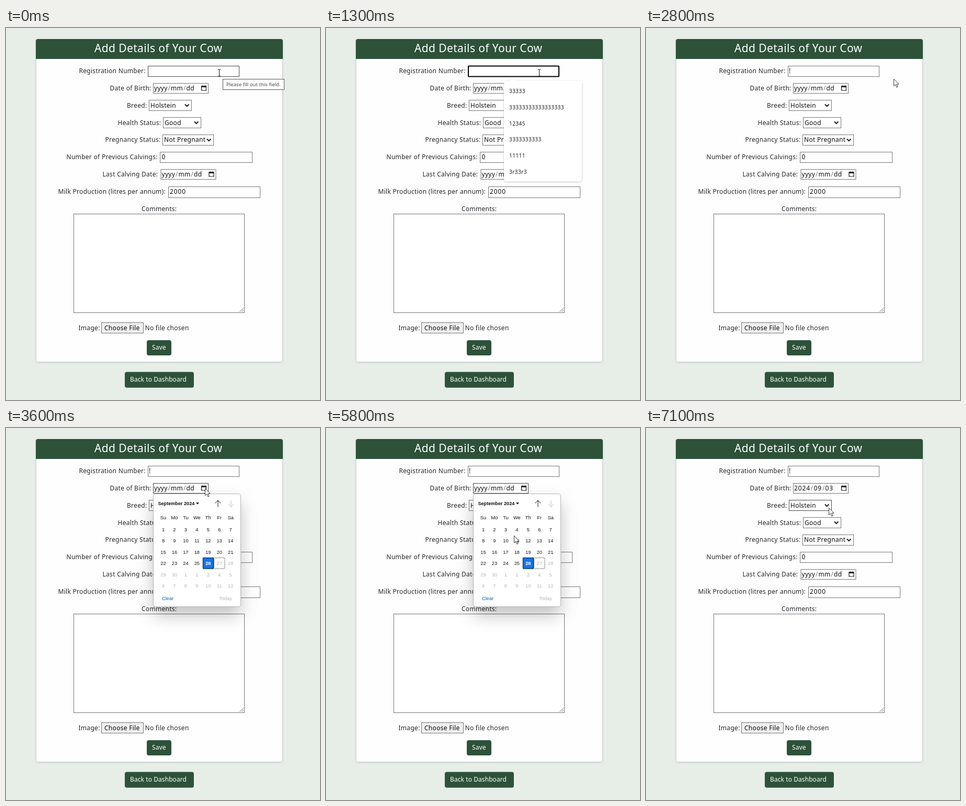
An HTML page for the animation above (8 s loop, 600 by 709 pixels).

```html
<!DOCTYPE html>
<html lang="en">
<head>
<meta charset="utf-8">
<title>Add Details of Your Cow</title>
<style>
  html, body { margin: 0; width: 100%; height: 100%; overflow: hidden; background: #e7ede7; }
  svg { display: block; width: 100%; height: 100%; }
  text { font: 12px "Noto Sans", "Open Sans", sans-serif; letter-spacing: .29px; fill: #212529; white-space: pre; }
  .value { fill: #0c0c0c; }
  .digits { fill: #0c0c0c; letter-spacing: .9px; }
  .slash { fill: #777; }
  .title { font-size: 21px; letter-spacing: .38px; fill: #fff; }
  .button { font-weight: 500; letter-spacing: .08px; fill: #fff; }
  .tip { font-size: 9.6px; letter-spacing: 0; fill: #4a4a4a; }
  .option { font-size: 10px; font-weight: 500; letter-spacing: .45px; fill: #1c1c1c; }
  #calendar text { font: 9.3px "Liberation Sans", Arial, sans-serif; letter-spacing: 0; fill: #111; }
  #calendar .month { font-size: 9.1px; font-weight: bold; }
  #calendar .day { text-anchor: middle; }
  #calendar .muted { fill: #b5b5b5; }
  #calendar .picked { fill: #fff; font-weight: bold; }
  #calendar .link { fill: #0b63a5; }
  .field { fill: #fff; stroke: #767676; }
  .green { fill: #2d5239; }
  .line { fill: none; stroke: #111; }
  .hover { fill: none; stroke: #484848; }
</style>
</head>
<body>
<svg id="stage" viewBox="0 0 600 709">
  <defs>
    <filter id="cardShadow" x="-5%" y="-5%" width="110%" height="110%">
      <feDropShadow dx="0" dy="1" stdDeviation="1.8" flood-opacity=".12"/>
    </filter>
    <filter id="listShadow" x="-10%" y="-10%" width="120%" height="120%">
      <feDropShadow dx="0" dy="1" stdDeviation="1.8" flood-opacity=".28"/>
    </filter>
    <filter id="calendarShadow" x="-40%" y="-30%" width="180%" height="170%">
      <feDropShadow dx="0" dy="17" stdDeviation="16" flood-opacity=".24"/>
    </filter>
  </defs>
  <rect width="600" height="709" fill="#e7ede7"/>
  <rect x="57" y="21" width="472" height="616" rx="4" fill="#fffefe" filter="url(#cardShadow)"/>
  <rect x="57.5" y="21.5" width="471" height="615" rx="4" fill="none" stroke="#c9d0ca"/>
  <path class="green" d="M57 59V25q0-4 4-4h464q4 0 4 4v34z"/>
  <g id="form"></g>
  <g id="focus">
    <rect x="272" y="72.5" width="173" height="20" rx="1.5" fill="#fff" stroke="#000" stroke-width="2"/>
  </g>
  <g id="mark"><text class="value" x="273" y="86">!</text></g>
  <rect id="regHover" class="hover" x="271.5" y="72.5" width="174" height="20"/>
  <rect id="dateHover" class="hover" x="281.5" y="105.5" width="105" height="19"/>
  <rect id="breedHover" class="hover" x="273.5" y="137.5" width="81" height="20"/>
  <g id="emptyDate"></g>
  <g id="filledDate"></g>
  <g id="tooltip">
    <rect x="414.5" y="97.5" width="117" height="20" fill="#fff" stroke="#555"/>
    <text class="tip" x="421" y="111">Please fill out this field.</text>
  </g>
  <g id="options">
    <path d="M345 101h139q5 0 5 5v181.5q0 5-5 5H345q-5 0-5-5V106q0-5 5-5h6l7-4 7 4z" fill="#fff" filter="url(#listShadow)"/>
  </g>
  <g id="calendar">
    <rect x="282" y="126" width="166" height="214" rx="4" fill="#fff" filter="url(#calendarShadow)"/>
    <rect x="281.5" y="125.5" width="167" height="215" rx="4" fill="none" stroke="#b4b4b4"/>
    <text class="month" x="290.5" y="147">September 2024</text>
    <path d="M363 142h6l-3 3.5z" fill="#111"/>
    <path class="line" d="M405 150.5v-12.5m-5.5 5.5l5.5-5.5 5.5 5.5"/>
    <path class="line" style="stroke:#bbb" d="M430 138v12.5m-5.5-5.5l5.5 5.5 5.5-5.5"/>
    <rect x="376.5" y="247.5" width="20" height="20.5" rx="1" fill="#1a73e8" stroke="#123a70" stroke-width="1.5"/>
    <rect x="397.5" y="247.5" width="20.5" height="20.5" rx="1" fill="none" stroke="#8c8c8c"/>
    <text class="link" x="298" y="328">Clear</text>
    <text class="muted" x="407" y="328">Today</text>
  </g>
  <g id="beam">
    <path fill="none" stroke="#fff" stroke-width="2.5" d="M0-6V6"/>
    <path class="line" d="M-3-6.5h2.5l.5.5.5-.5H3M0-6V6M-3 6.5h2.5l.5-.5.5.5H3"/>
  </g>
  <path id="arrow" fill="#fff" stroke="#222" stroke-width=".9" stroke-linejoin="round"
    d="M0 0V13.7L3.2 10.8 5.4 16 7.6 15.1 5.4 10.1H9.7Z"/>
</svg>
<script>
const NS = 'http://www.w3.org/2000/svg';
const $ = id => document.getElementById(id);

function add(parent, tag, attrs, content = '') {
  const node = document.createElementNS(NS, tag);
  for (const key in attrs) node.setAttribute(key, attrs[key]);
  node.textContent = content;
  return parent.appendChild(node);
}
const form = $('form');
const write = (parent, content, x, y, style = '') => add(parent, 'text', { x, y, class: style }, content);
const box = (x, y, width, height, extra = {}) =>
  add(form, 'rect', { x: x + .5, y: y + .5, width, height, class: 'field', ...extra });
const path = (d, extra = {}) => add(form, 'path', { d, class: 'line', ...extra });

function select(x, y, width, value, baseline) {
  box(x, y, width, 20);
  write(form, value, x + 3, baseline, 'value');
  path(`M${x + width - 12} ${y + 8.5}l3.7 3.7 3.7-3.7`, { 'stroke-width': 1.8 });
}

function dateParts(parent, x, y, parts, offsets, style) {
  const [year, month, day] = parts;
  const [slash1, m, slash2, d] = offsets;
  write(parent, year, x, y, style);
  write(parent, '/', x + slash1, y, 'slash');
  write(parent, month, x + m, y, style);
  write(parent, '/', x + slash2, y, 'slash');
  write(parent, day, x + d, y, style);
}
const blankDate = (parent, x, y) =>
  dateParts(parent, x, y, ['yyyy', 'mm', 'dd'], [26.5, 32, 56, 61.5], 'value');

function dateBox(x, y) {
  box(x, y, 105, 19);
  const left = x + 92.5, top = y + 6;
  path(`M${left} ${top}h9v8h-9z`, { 'stroke-width': 1.2 });
  path(`M${left} ${top + .7}h9`, { 'stroke-width': 2.4 });
  path(`M${left + 2} ${top - 1.7}v2m5-2v2`, { 'stroke-width': 1.2 });
}

function button(x, y, width, height, label, textX, baseline) {
  add(form, 'rect', { x, y, width, height, rx: 4, class: 'green' });
  write(form, label, textX, baseline, 'button');
}

write(form, 'Add Details of Your Cow', 169, 46.4, 'title');
[
  ['Registration Number:', 139.5, 86], ['Date of Birth:', 198.5, 119],
  ['Breed:', 231, 152], ['Health Status:', 213.5, 185],
  ['Pregnancy Status:', 189.5, 217], ['Number of Previous Calvings:', 115.5, 250],
  ['Last Calving Date:', 184.5, 283], ['Milk Production (litres per annum):', 99.5, 316],
  ['Comments:', 259, 348.5], ['Image:', 138.5, 575.5]
].forEach(([label, x, y]) => write(form, label, x, y));

box(271, 72, 174, 20);
dateBox(281, 105);
select(273, 137, 81, 'Holstein', 152);
select(300, 170, 72, 'Good', 185);
select(299, 203, 97, 'Not Pregnant', 217);
box(294, 236, 176, 20);
write(form, '0', 297.5, 250, 'digits');
dateBox(295.5, 269);
blankDate(form, 297.5, 283);
box(310, 302, 175, 21);
write(form, '2000', 313, 316, 'digits');
box(129, 354, 326, 188);
path('M446.5 541l7.5-7.5m-3.5 7.5l3.5-3.5', { style: 'stroke:#666' });
box(182, 561, 80, 20, { style: 'fill:#efefef' });
write(form, 'Choose File', 188, 575.5, 'value');
write(form, 'No file chosen', 265.5, 575.5);
button(269, 595, 47, 29, 'Save', 279, 612.5);
button(227, 655.5, 132, 30, 'Back to Dashboard', 237, 674);

blankDate($('emptyDate'), 283, 119);
dateParts($('filledDate'), 283, 119, ['2024', '09', '03'], [31.5, 37.5, 54, 59.5], 'digits');

['33333', '3'.repeat(17), '12345', '3333333333', '11111', '3r33r3']
  .forEach((entry, i) => write($('options'), entry, 350, 124.3 + i * 30.7, 'option'));

const calendar = $('calendar');
const column = i => 300.5 + i * 21.45;
['Su', 'Mo', 'Tu', 'We', 'Th', 'Fr', 'Sa']
  .forEach((name, i) => write(calendar, name, column(i), 174, 'day'));
for (let i = 0; i < 42; i++) {
  const style = i === 25 ? 'day picked' : i > 25 ? 'day muted' : 'day';
  write(calendar, i % 30 + 1, column(i % 7), 196.8 + Math.floor(i / 7) * 21.45, style);
}

const LOOP = 8000;
// time, x, y
const route = [
  [0, 408, 85], [2400, 408, 85], [2600, 450, 93], [2800, 473, 97],
  [2900, 470, 98], [3300, 383, 114], [3400, 380, 115], [3800, 380, 115],
  [4000, 395, 190], [4200, 415, 290], [4800, 415, 290], [4900, 413, 279],
  [5400, 391, 236], [5600, 391, 236], [5900, 343, 190], [6100, 343, 190],
  [6200, 347, 192], [6500, 349, 153], [6600, 349, 152], [LOOP, 349, 152]
];

function pointAt(t) {
  const next = Math.max(1, route.findIndex(stop => stop[0] > t));
  const [t0, x0, y0] = route[next - 1], [t1, x1, y1] = route[next];
  const p = (t - t0) / (t1 - t0);
  return [x0 + (x1 - x0) * p, y0 + (y1 - y0) * p];
}

// opacity steps: time, value
const visibility = {
  tooltip: [[0, 1], [1000, 0]],
  regHover: [[0, 1], [1000, 0]],
  focus: [[0, 0], [1000, 1], [2600, 0]],
  options: [[0, 0], [1000, .3], [1100, .75], [1200, 1], [2000, 0]],
  mark: [[0, 0], [2000, 1]],
  beam: [[0, 1], [2600, 0]],
  arrow: [[0, 0], [2600, 1]],
  dateHover: [[0, 0], [3300, 1], [6000, 0]],
  calendar: [[0, 0], [3400, .6], [3500, 1], [6000, 0]],
  emptyDate: [[0, 1], [6000, 0]],
  filledDate: [[0, 0], [6000, 1]],
  breedHover: [[0, 0], [6500, 1]]
};

function draw(time) {
  const t = Math.floor(time % LOOP / 100) * 100;
  for (const id in visibility) {
    const step = visibility[id].filter(([start]) => start <= t).pop();
    $(id).setAttribute('opacity', step[1]);
  }
  const [x, y] = pointAt(t);
  $('beam').setAttribute('transform', `translate(${x - .5} ${y + .5})`);
  $('arrow').setAttribute('transform', `translate(${x + .5} ${y})`);
}

const begin = performance.now();
function tick() {
  draw(performance.now() - begin);
  requestAnimationFrame(tick);
}
tick();
</script>
</body>
</html>
```
